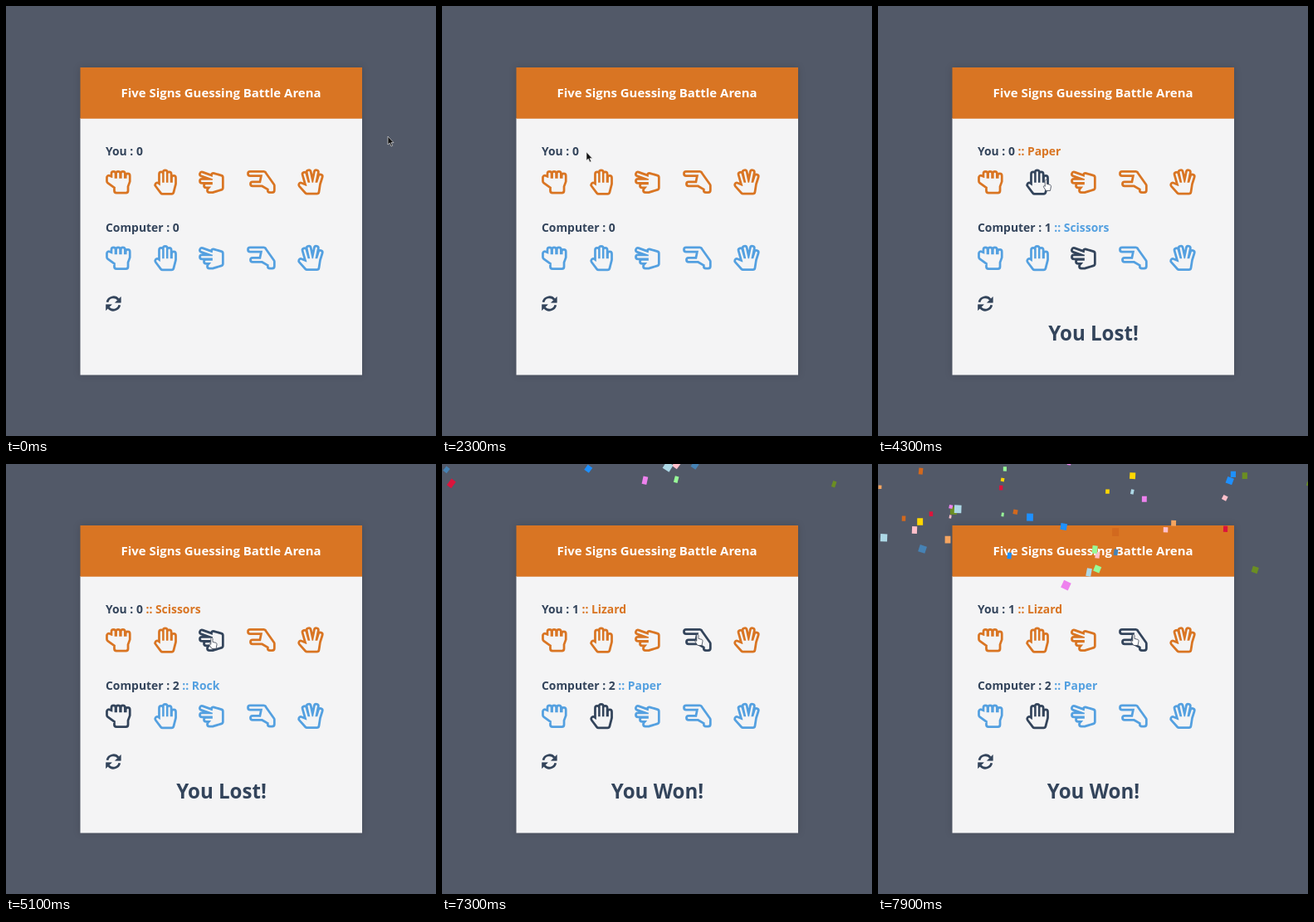
An HTML page for the animation above (8000 ms loop, 518 px wide and 518 px high).

```html
<!DOCTYPE html>
<html lang="en">
<head>
<meta charset="utf-8">
<title>Hand game</title>
<style>
  html, body { margin: 0; height: 100%; overflow: hidden; background: #525968; }
  svg { display: block; width: 100vw; height: 100vh; }
  text { font: 700 13.9px "Open Sans", "Noto Sans", sans-serif; fill: #33445b; white-space: pre; }
  .title { font-size: 14.95px; fill: #fff; text-anchor: middle; }
  .result { font-size: 24.1px; text-anchor: middle; }
  .panel { filter: drop-shadow(0 0 4px rgba(0, 0, 0, .15)); }
  .hands path { fill: currentColor; stroke: currentColor; stroke-width: 7.8; stroke-linejoin: round; stroke-linecap: round; }
  .hands .inside { color: #f4f4f5; stroke-width: 2.3; }
</style>
</head>
<body>
<svg id="stage" viewBox="0 0 518 518">
  <rect width="518" height="518" fill="#525968"/>
  <g class="panel">
    <rect x="89.5" y="135" width="339.5" height="309.5" fill="#f4f4f5"/>
    <rect x="89.5" y="74" width="339.5" height="61.7" fill="#d97523"/>
  </g>
  <text class="title" x="259" y="109.5">Five Signs Guessing Battle Arena</text>
  <text x="120" y="180"><tspan id="youScore"></tspan><tspan id="youPick" fill="#d97523"></tspan></text>
  <text x="120" y="271.5"><tspan id="cpuScore"></tspan><tspan id="cpuPick" fill="#54a0e0"></tspan></text>
  <g id="youHands" class="hands"></g>
  <g id="cpuHands" class="hands" transform="translate(0 91.5)"></g>
  <g id="refresh" fill="#33445b" stroke="#33445b">
    <g id="halfTurn">
      <path d="M122 356.7A7.6 7.6 0 0 1 135.3 353.6" fill="none" stroke-width="2.8"/>
      <path d="M138.3 350.5V357.3H131.5Z" stroke-width=".6" stroke-linejoin="round"/>
    </g>
    <use href="#halfTurn" transform="rotate(180 129.4 358.5)"/>
  </g>
  <text class="result" id="result" x="259.5" y="403.4"></text>
  <path id="arrow" d="M0 0V10L2.3 8 4 12 5.7 11.2 4 7.6H7Z" fill="#111" stroke="#ddd" stroke-width=".7"/>
  <path id="pointer" d="M-2.7-5.4C-2.7-7.1-.5-7.1-.5-5.4V-1.6L3.4-.6C4.5-.2 4.6.8 4.4 2L3.5 6.5H-1.5L-4.4 2.2C-5 .6-3.6 0-2.7 1.4Z" fill="#fff" stroke="#4c5360" stroke-width=".9"/>
  <g id="confetti"></g>
</svg>
<script>
const $ = id => document.getElementById(id);
const DARK = '#33445b', ORANGE = '#d97523', BLUE = '#54a0e0';
const LOOP = 8000, STEP = 100;

// Finger and palm centre lines; a wide stroke under a thin one makes the outline
const hands = {
  Rock: 'M129.5 202V209M135.1 201.8V209M140.8 202V209M146.7 204.5V209M124 206.8V211L133 217.5V222.5H144.5V217L146.7 211V209H129.5Z',
  Paper: 'M187 202.5V214M191.8 200.3V214M196.6 202.3V214M202 207V214M182.2 215.5 188.5 223.8H199.5L202 214H187V219Z',
  Scissors: 'M236 202.5 250 207.5M236 210.8H250M241 216.3H250M250 204 258.8 206.5V219L249 222H245L250 216Z',
  Lizard: 'M294 202H310.5L320.8 216.5V222H317.8V219.5L309 214.3H297 308L310.5 202Z',
  Spock: 'M359.6 202.8 362.8 214M364.7 200.2 367.7 214M373.8 200.2 371 214M378.7 205.5 376 214M355.2 215.5 362.5 223.6H374.5L376 214H363L364 219Z'
};

const rounds = [
  { at: 0, you: 0, cpu: 0, result: '' },
  { at: 3100, you: 0, cpu: 1, youPick: 'Paper', cpuPick: 'Scissors', result: 'You Lost!' },
  { at: 5100, you: 0, cpu: 2, youPick: 'Scissors', cpuPick: 'Rock', result: 'You Lost!' },
  { at: 7200, you: 1, cpu: 2, youPick: 'Lizard', cpuPick: 'Paper', result: 'You Won!' }
];

const cursorHome = { x: 460, y: 157 };
const cursorMoves = [
  { from: 1000, to: 2300, x: 174, y: 176 },
  { from: 2300, to: 2500, x: 188, y: 216 },
  { from: 4200, to: 4500, x: 249.5, y: 216 },
  { from: 6300, to: 6600, x: 309.5, y: 212 }
];
const POINTER_FROM = 2400;

const CONFETTI_START = 7200, FLAKES = 50;
const flakeColors = ['dodgerblue', 'olivedrab', 'gold', 'pink', 'lightblue', 'violet',
  'palegreen', 'steelblue', 'sandybrown', 'chocolate', 'crimson'];

let seed = 48271;
function random(min, max) {
  seed = seed * 16807 % 2147483647;
  return min + (max - min) * seed / 2147483647;
}

function setAttrs(node, attrs) {
  for (const key in attrs) node.setAttribute(key, attrs[key]);
  return node;
}

function add(parent, tag, attrs = {}) {
  const node = document.createElementNS(parent.namespaceURI, tag);
  return parent.appendChild(setAttrs(node, attrs));
}

function drawHands(id) {
  return Object.entries(hands).map(([name, d]) => {
    const node = add($(id), 'g');
    add(node, 'path', { d });
    add(node, 'path', { d, class: 'inside' });
    return { name, node };
  });
}
const youHands = drawHands('youHands'), cpuHands = drawHands('cpuHands');

const flakes = Array.from({ length: FLAKES }, (_, i) => ({
  x: random(0, 540),
  y: random(-150, 10),
  size: random(4, 10),
  phase: random(0, Math.PI),
  node: add($('confetti'), 'rect', { fill: flakeColors[i % flakeColors.length] })
}));

function paintHands(list, pick, color) {
  for (const { name, node } of list) node.setAttribute('color', name === pick ? DARK : color);
}

function showRound(t) {
  const round = rounds.findLast(r => r.at <= t);
  const label = pick => pick ? ':: ' + pick : '';
  $('youScore').textContent = `You : ${round.you} `;
  $('cpuScore').textContent = `Computer : ${round.cpu} `;
  $('youPick').textContent = label(round.youPick);
  $('cpuPick').textContent = label(round.cpuPick);
  $('result').textContent = round.result;
  paintHands(youHands, round.youPick, ORANGE);
  paintHands(cpuHands, round.cpuPick, BLUE);
}

function moveCursor(t) {
  let { x, y } = cursorHome;
  for (const move of cursorMoves) {
    const p = Math.min(1, Math.max(0, (t - move.from) / (move.to - move.from)));
    const eased = p * p * (3 - 2 * p);
    x += (move.x - x) * eased;
    y += (move.y - y) * eased;
  }
  const isPointer = t >= POINTER_FROM;
  $('arrow').style.display = isPointer ? 'none' : '';
  $('pointer').style.display = isPointer ? '' : 'none';
  setAttrs($(isPointer ? 'pointer' : 'arrow'), { transform: `translate(${x} ${y})` });
}

function dropConfetti(t) {
  const age = t - CONFETTI_START;
  $('confetti').style.display = age >= 0 ? '' : 'none';
  for (const { x, y, size, phase, node } of flakes) {
    // Larger pieces fall faster; each one narrows as it turns
    const speed = (11 + 5.5 * size) / 300;
    const turn = phase + age / 200;
    const width = size * (.8 + .2 * Math.cos(turn));
    setAttrs(node, {
      x: -width / 2, y: -size / 2, width, height: size,
      transform: `translate(${x - .03 * age} ${y + speed * age}) rotate(${20 + 20 * Math.sin(turn)})`
    });
  }
}

const start = performance.now();
function frame() {
  const elapsed = (performance.now() - start) % LOOP;
  const t = Math.floor(elapsed / STEP) * STEP;
  showRound(t);
  moveCursor(t);
  dropConfetti(t);
  requestAnimationFrame(frame);
}
frame();
</script>
</body>
</html>
```
